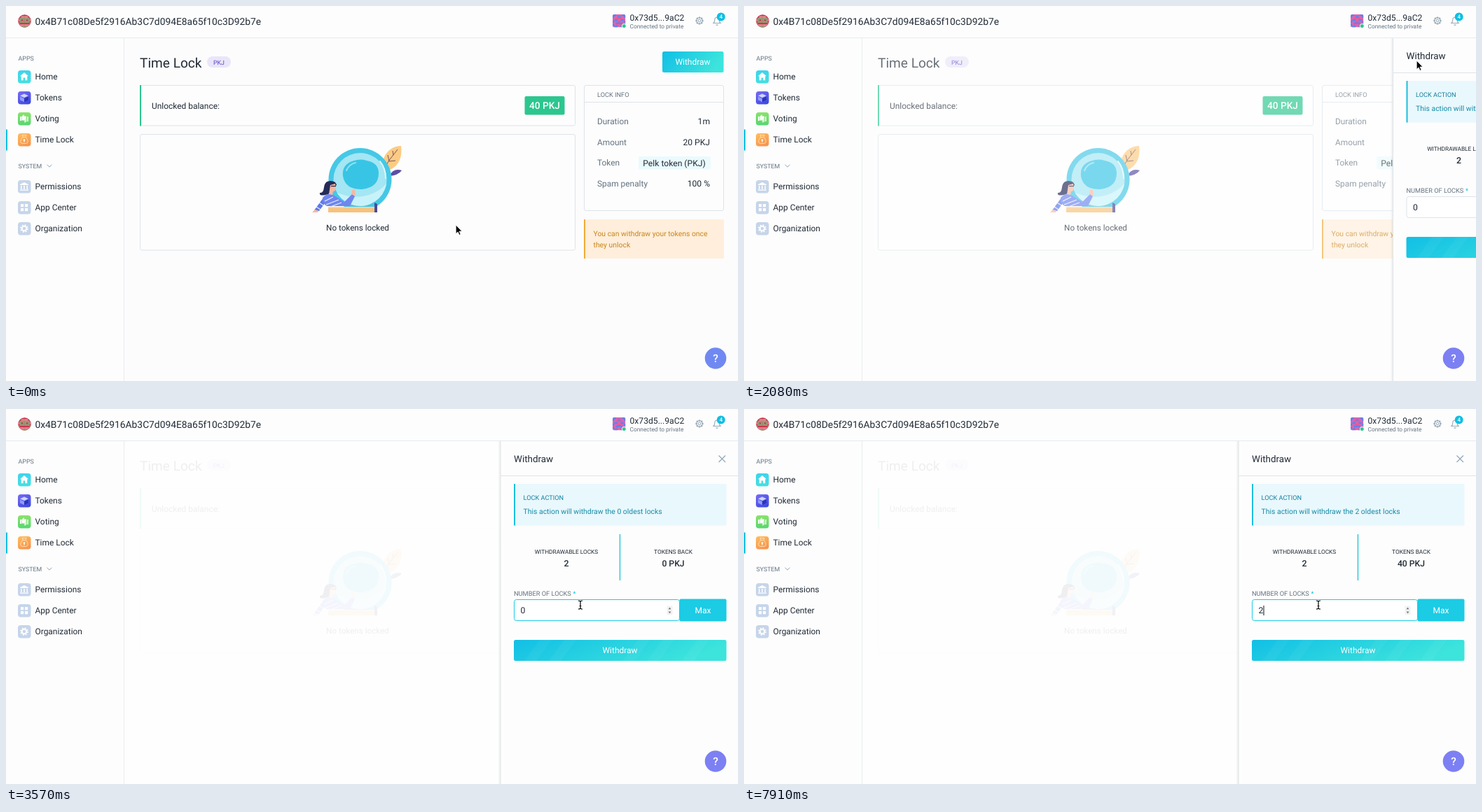
Animation, 1045 px wide and 536 px high, one loop 8000 ms. Source, as an HTML page:

```html
<!DOCTYPE html>
<html lang="en">
<head>
<meta charset="utf-8">
<title>Time Lock</title>
<style>
html, body { margin: 0; width: 100%; height: 100%; overflow: hidden; background: #fcfcfd; }
svg { display: block; }
text { font-family: Roboto, "Open Sans", sans-serif; text-rendering: geometricPrecision; white-space: pre; }
</style>
</head>
<body>
<svg id="stage" width="1045" height="536" viewBox="0 0 1045 536"></svg>
<script>
const LOOP = 8000, TICK = 148.5;
const INK = '#212b36', GREY = '#637381', LINE = '#dde4e9', CYAN = '#1ccbe4', GREEN = '#2cc68f', PAPER = '#fdfdfd';

const rect = (x, y, w, h, fill, more = '') =>
  `<rect x="${x}" y="${y}" width="${w}" height="${h}" fill="${fill}" ${more}/>`;
const circle = (x, y, r, fill, more = '') => `<circle cx="${x}" cy="${y}" r="${r}" fill="${fill}" ${more}/>`;
const path = (d, fill, more = '') => `<path d="${d}" fill="${fill}" ${more}/>`;
const line = (d, color, w = 1, more = '') => path(d, 'none', `stroke="${color}" stroke-width="${w}" ${more}`);
const text = (x, y, size, str, fill = INK, more = '') =>
  `<text x="${x}" y="${y}" font-size="${size}" fill="${fill}" ${more}>${str}</text>`;
const mid = 'text-anchor="middle"', end = 'text-anchor="end"', medium = 'font-weight="500"';
const card = (x, y, w, h) => rect(x + .5, y + .5, w - 1, h - 1, PAPER, `rx="2.5" stroke="${LINE}"`);

const defs = `<defs>
  <linearGradient id="go" x1="0" y1="0" x2="1" y2=".25"><stop stop-color="#12bfe5"/><stop offset="1" stop-color="#3de4dc"/></linearGradient>
  <linearGradient id="home" x2="0" y2="1"><stop stop-color="#3fd3ee"/><stop offset="1" stop-color="#45dfe0"/></linearGradient>
  <linearGradient id="coin" x2=".6" y2="1"><stop stop-color="#7b6cf5"/><stop offset="1" stop-color="#3f4be0"/></linearGradient>
  <linearGradient id="vote" x2="0" y2="1"><stop stop-color="#8be36a"/><stop offset="1" stop-color="#56d672"/></linearGradient>
  <linearGradient id="lock" x2=".5" y2="1"><stop stop-color="#ffbe5c"/><stop offset="1" stop-color="#f7964f"/></linearGradient>
  <linearGradient id="edge"><stop stop-color="#000" stop-opacity="0"/><stop offset="1" stop-color="#000" stop-opacity=".07"/></linearGradient>
  <clipPath id="round"><circle cx="26.5" cy="21.5" r="9.3"/></clipPath>
  <clipPath id="tile"><rect x="866" y="12" width="18.4" height="18.4" rx="2.5"/></clipPath>
  <clipPath id="globe"><circle cx="505.5" cy="248" r="38"/></clipPath>
</defs>`;

// Mirrored 8x8 avatar; each row lists the left half.
function avatar(x, y, size, rows, colors) {
  const c = size / 8;
  let out = rect(x, y, size, size, colors[0]);
  rows.forEach((row, j) => [...row].forEach((k, i) => {
    if (k > 0) for (const col of [i, 7 - i])
      out += rect(x + col * c, y + j * c, c + .1, c + .1, colors[k]);
  }));
  return out;
}

function header() {
  const teeth = [...Array(8).keys()].map(i =>
    `<rect x="-1.2" y="-5.6" width="2.4" height="2.4" rx=".6" transform="rotate(${i * 45})"/>`).join('');
  return rect(0, 0, 1045, 45, PAPER) + rect(0, 45, 1045, 1, '#e6ebef') +
    `<g clip-path="url(#round)">${avatar(17, 12, 19, ['0000', '0022', '0111', '2101', '0111', '1000', '0222', '0011'], ['#cb3550', '#93a078', '#e38d92'])}</g>` +
    text(41.5, 26.5, 13.8, '0x4B71c08De5f2916Ab3C7d094E8a65f10c3D92b7e') +
    `<g clip-path="url(#tile)">${avatar(866, 12, 18.4, ['1100', '1001', '0022', '0110', '1002', '0011', '1020', '0110'], ['#dd63b0', '#5585f0', '#e55a98'])}</g>` +
    circle(882.3, 28.6, 3, GREEN, 'stroke="#fff"') +
    text(890.5, 21.3, 12.15, '0x73d5...9aC2') + text(890.5, 32, 8.35, 'Connected to private', GREY) +
    `<g transform="translate(990 21)" fill="none" stroke="#9aabba"><circle r="4.5"/><circle r="1.8"/><g fill="#9aabba" stroke="none">${teeth}</g></g>` +
    line('M1010 24.5q1.8-1.5 1.8-5a3.2 3.2 0 0 1 6.4 0q0 3.5 1.8 5zM1013.5 26.5q1.5 1.5 3 0', '#9aabba', 1.1) +
    circle(1020.7, 15.5, 6, '#0fbfe2') + text(1020.7, 18.4, 8, '4', '#fff', `${mid} ${medium}`);
}

function sidebar() {
  const items = [
    ['Home', 101, 'url(#home)', path('M26 95l6 5.2h-1.7v6h-3v-3.6h-2.6v3.6h-3v-6h-1.7z', '#fff')],
    ['Tokens', 131, 'url(#coin)', path('M26 125.5l6 2.8-6 2.8-6-2.8z', '#cfd6ff') + path('M20 129.5l6 2.8v5l-6-3z', '#8f9bff') + path('M32 129.5l-6 2.8v5l6-3z', '#2b34b5')],
    ['Voting', 161, 'url(#vote)', path('M20 158h2v6h-2zM22.5 158l3-3 .5 2.5h3v6h-6.5z', '#fff') + path('M32 158h-2v7h2zM29.5 165l-3 2-.5-3 3-6z', '#d8f7d1')],
    ['Time Lock', 191, 'url(#lock)', line('M24 187l-1-2.5h6l-1 2.5M23.7 187.5h4.6q3 3.5 3 6 0 3-3 3h-4.6q-3 0-3-3 0-2.5 3-6z', '#ffe9c9', .8) + circle(26, 191.5, 1.2, '#fff') + rect(25.5, 192, 1, 2.8, '#fff')],
    ['Permissions', 258, '#c6d5ea', path('M26 252l6 3v1h-12v-1zM21 257h1.5v5h-1.5zM25.2 257h1.6v5h-1.6zM29.5 257h1.5v5h-1.5zM20 262.5h12v1.3h-12z', '#fff')],
    ['App Center', 288, '#c6d5ea', [[21, 283], [27, 283], [21, 289], [27, 289]].map(p => rect(...p, 4.2, 4.2, '#fff', 'rx=".6"')).join('')],
    ['Organization', 318, '#c6d5ea', circle(26, 318, 3.3, 'none', 'stroke="#fff" stroke-width="2"') + circle(26, 318, 5, 'none', 'stroke="#fff" stroke-width="1.6" stroke-dasharray="2 1.927"')]
  ];
  return rect(0, 46, 168, 490, PAPER) + rect(168, 46, 1, 490, '#e6ebef') +
    text(17.5, 78, 8.9, 'APPS', GREY) + text(17.5, 232, 8.8, 'SYSTEM', GREY) +
    line('M58.5 226.7l3.5 3.5 3.5-3.5', '#8fa4b5') + rect(0, 176.5, 2, 30, '#0fbfe2') +
    items.map(([name, y, fill, glyph]) =>
      rect(17, y - 9, 18.5, 18.5, fill, 'rx="4"') + glyph + text(41.5, y + 4.4, 11.95, name)).join('');
}

function picture() {
  return path('M537 235C535 217 546 200 564 200C566 214 562 232 541 236z', '#fccb83') +
    line('M537 237Q546 220 559 205M547 222l-2-9M547 222l9-1M553 213l-1-6', '#6a4a54', .9) +
    path('M547 243q6-12 18-8-5 7-18 8z', '#5a4fa5') +
    circle(505.5, 248, 45, '#45c8e6') + circle(505.5, 248, 38, '#a4e6f3') +
    `<g clip-path="url(#globe)">` +
      path('M462 262q30 16 56 8 24-8 30-26v50h-86z', '#c8f2f9') +
      path('M516 290q26-16 29-44 6 36-18 50z', '#7fdaee') +
    `</g>` +
    path('M481 243q-2-17 16-22 9-3 18 0 17 3 17 18 0 21-25 23-23 0-26-19z', '#38c5e5') +
    line('M486 235q4-9 13-11', '#8fe2f3', 2, 'stroke-linecap="round"') +
    line('M534 222q8 10 8 24', '#dff8fc', 2, 'stroke-linecap="round"') +
    rect(460, 287, 70, 8, '#f7c27b') + rect(460, 287, 70, 1.5, '#fbd8a4') +
    path('M526 281l4 2v12h-4z', '#4c4a9c') +
    path('M440 292l13-18 5 4-11 15z', '#5f79e8') + path('M437 295l4-4 5 2-1 2z', '#f6b9a0') +
    path('M452 274q5-6 13-5l18 11 11-11 4 3-7 14h-33q-7-4-6-12z', '#6f86ef') +
    line('M455 279l12-6M457 284l18-7M463 287l16-6M443 287l6 4M447 281l6 4', '#e9edff', 1.2) +
    path('M493 269l1-6 4-1 1 9z', '#f6b9a0') +
    path('M456 270q-9 2-8-3 5 1 6-8 1-9 9-9 8 0 9 6l-6 4q0 8-10 10z', '#252b57') +
    path('M463 256l7-2 1 7q-1 4-4 4l-1 5-5-1z', '#f6b9a0') + line('M464 257.5h7', '#252b57', 1.3);
}

function main() {
  const row = (y, name, value) => text(844, y, 11.9, name, GREY) + text(1005, y, 12.1, value, INK, end);
  return text(191, 87.7, 19.1, 'Time Lock') +
    rect(287, 72, 34, 16, '#e9e6f9', 'rx="8"') + text(304, 83.6, 8.8, 'PKJ', '#5f45c0', mid) +
    `<g id="open">${rect(937, 65, 87.5, 30, 'url(#go)', 'rx="2.5"')}${text(980.5, 84.3, 12, 'Withdraw', '#fff', mid)}</g>` +
    card(191, 113, 622, 58.5) + rect(191, 113, 2, 58.5, GREEN) + text(208, 147, 11.95, 'Unlocked balance:') +
    rect(740.5, 129, 57, 26.5, GREEN, 'rx="2"') + text(769, 147.2, 13.7, '40 PKJ', '#fff', `${mid} ${medium}`) +
    card(191, 183, 622, 166.5) + picture() + text(502, 321, 11.7, 'No tokens locked', INK, mid) +
    card(825, 113, 200, 180) + rect(826, 137, 198, 1, LINE) + text(844, 129.5, 9.2, 'LOCK INFO', GREY) +
    row(169.4, 'Duration', '1m') + row(199, 'Amount', '20 PKJ') + row(228.4, 'Token', '') +
    rect(903, 215, 103, 18.5, '#ebfafd', 'rx="2"') + text(954, 228.6, 12.15, 'Pelk token (PKJ)', INK, mid) +
    row(258, 'Spam penalty', '100 %') +
    rect(825, 305, 200, 56, '#ffeedb', 'rx="1"') + rect(825, 305, 2, 56, '#f0ac3c') +
    text(838.5, 328.6, 10.4, 'You can withdraw your tokens once', '#c88518') +
    text(838.5, 344.6, 10.4, 'they unlock', '#c88518');
}

function panel() {
  const stripe = x => path(`M${x} 360l22-30h17l-22 30z`, '#fff', 'opacity=".04"');
  return rect(702, 46, 4, 490, 'url(#edge)') + rect(706, 46, 345, 490, PAPER) + rect(705.5, 46, 1, 490, LINE) +
    text(725, 75.6, 13.4, 'Withdraw') + line('M1017.5 66.5l9.5 9.5m0-9.5l-9.5 9.5', '#8fa4b5', 1.1) +
    rect(706, 95, 345, 1, LINE) +
    rect(725, 107, 303.5, 59.5, '#e9f8fd', 'rx="1"') + rect(725, 107, 2, 59.5, '#1cbfe0') +
    text(738.5, 129.6, 9.2, 'LOCK ACTION', '#127fa0') + text(738.5, 150.4, 10.43, '', '#128aa6', 'id="note"') +
    rect(875.7, 179, 1.5, 66, '#32c9dc') +
    text(800, 207, 8.3, 'WITHDRAWABLE LOCKS', INK, mid) + text(800, 225.4, 12.4, '2', INK, `${mid} ${medium}`) +
    text(952.5, 207, 8.35, 'TOKENS BACK', INK, mid) + text(952.5, 225.4, 12.2, '', INK, `${mid} ${medium} id="back"`) +
    text(725, 266.8, 9.25, 'NUMBER OF LOCKS', GREY) + text(809.5, 267, 9.25, '*', '#0fbfe2') +
    rect(725.5, 272.5, 236, 30, '#fff', `rx="3" stroke="${LINE}" id="field"`) +
    text(734.6, 292.2, 12.2, '', INK, 'id="value"') +
    `<g id="spin">${rect(943.5, 281.5, 8, 12.5, '#f0f1f2', 'rx="1"')}${path('M947.5 283.5l1.9 2.8h-3.8zM947.5 292.2l1.9-2.8h-3.8z', '#777')}</g>` +
    rect(0, 281, 1, 14, '#111', 'id="caret"') +
    rect(961.5, 271.5, 67, 32, CYAN, 'rx="2"') + text(995, 291.8, 12, 'Max', '#fff', mid) +
    rect(725, 330, 303.5, 30, 'url(#go)', 'rx="2.5"') + [740, 775, 880, 915, 965].map(stripe).join('') +
    text(876.5, 349.2, 11.95, 'Withdraw', '#fff', mid);
}

const pointers =
  `<path id="arrow" d="M-.8 0v12.5l2.9-2.6 2 4.4 2-.9-2-4.3h3.9z" fill="#000" stroke="#fff" stroke-width=".8"/>` +
  `<path id="beam" d="M-3-6q3 0 3 1.8q0-1.8 3-1.8M0-4.500v9M-3 6q3 0 3-1.8q0 1.8 3 1.8M-1.3 1.5h2.6" fill="none" stroke="#000" stroke-width="1.2"/>`;

document.getElementById('stage').innerHTML = defs + rect(0, 0, 1045, 536, '#fcfcfd') + main() +
  rect(169, 46, 876, 490, '#fefefe', 'id="veil"') + `<g id="panel">${panel()}</g>` + header() + sidebar() +
  circle(1013, 503.5, 15.3, '#7c80f2', 'id="help"') + text(1013, 509, 15.5, '?', '#fff', `${mid} ${medium}`) + pointers;

const $ = id => document.getElementById(id);
const set = (id, name, v) => $(id).setAttribute(name, v);
const show = (id, on) => set(id, 'visibility', on ? 'visible' : 'hidden');

// Pointer path: tick, x, y
const route = [
  [0, 643, 313], [1, 678, 304], [2, 758, 277], [3, 834, 248], [4, 892, 212], [5, 914, 191], [7, 914, 191],
  [8, 920, 172], [9, 934, 133], [10, 950, 100], [11, 959, 82], [12, 961, 78], [15, 961, 78],
  [16, 921, 132], [17, 861, 192], [18, 836, 238], [19, 824, 268], [20, 820, 280], [60, 820, 280]
];
// Caret: time, x (0 = off)
const blinks = [
  [0, 0], [3120, 735], [3570, 0], [4170, 735], [4620, 0], [4770, 738], [5370, 0], [5670, 738],
  [6120, 0], [6570, 738], [7020, 0], [7170, 738], [7610, 0], [7910, 741.5]
];

function pointerAt(n) {
  const i = Math.max(1, route.findIndex(k => k[0] >= n));
  const [a, ax, ay] = route[i - 1], [b, bx, by] = route[i];
  const f = (n - a) / (b - a);
  return [ax + (bx - ax) * f, ay + (by - ay) * f];
}

function draw(t) {
  const n = Math.floor((t + 3) / TICK);     // motion advances in ticks
  const u = Math.max(0, n - 13);            // ticks since the click
  const left = Math.exp(-.43 * u * u);      // share of the slide still to go
  const count = t < 4770 ? 0 : t < 7910 ? 1 : 2;
  const [x, y] = pointerAt(n);
  const typing = n >= 20;

  set('panel', 'transform', `translate(${(left * 339).toFixed(2)} 0)`);
  show('panel', u > 0);
  set('veil', 'opacity', .93 * (1 - left));
  set('open', 'transform', `translate(0 ${n >= 13 ? 1 : 0})`);
  set('help', 'fill', u > 0 ? '#7c80f2' : '#7089f2');

  $('note').textContent = `This action will withdraw the ${count} oldest locks`;
  $('back').textContent = `${count * 20} PKJ`;
  $('value').textContent = count;
  set('value', 'x', count === 1 ? 733 : 734.6);
  set('field', 'stroke', n >= 21 ? CYAN : LINE);
  show('spin', typing);

  const caret = blinks.filter(b => b[0] <= t).pop()[1];
  set('caret', 'x', caret);
  show('caret', caret > 0);

  for (const id of ['arrow', 'beam']) set(id, 'transform', `translate(${x} ${y})`);
  show('arrow', !typing);
  show('beam', typing);
}

function loop() {
  draw(performance.now() % LOOP);
  requestAnimationFrame(loop);
}
loop();
</script>
</body>
</html>
```
